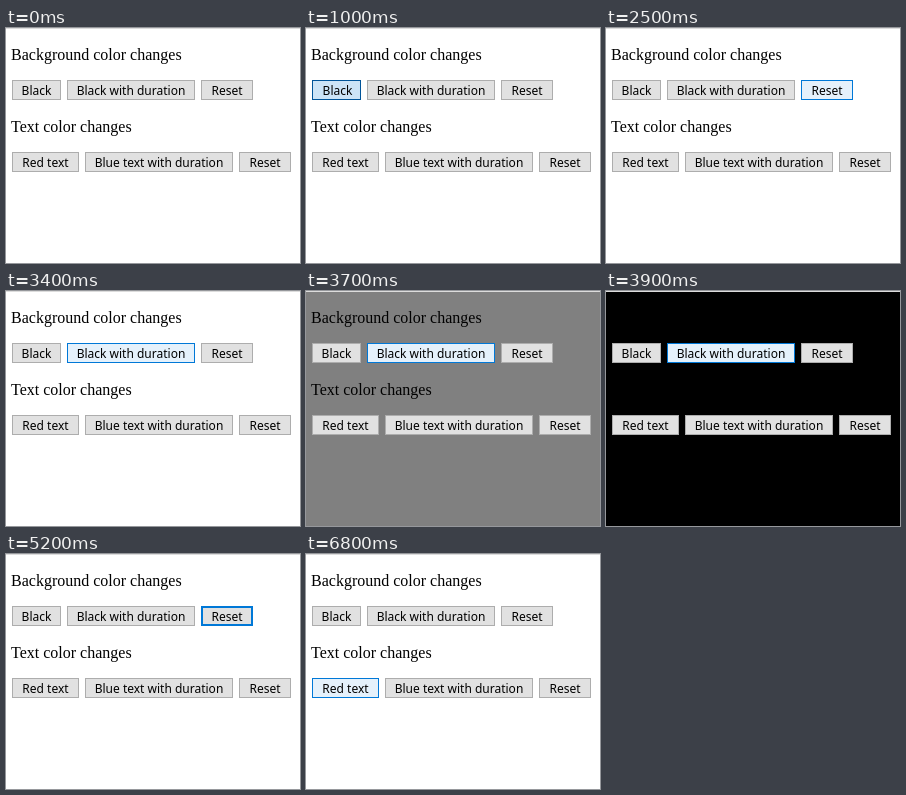
Write an HTML page that moves like this. It is 294x235 px and loops after 8000 ms.

```html
<!DOCTYPE html>
<html lang="en">
<head>
<meta charset="utf-8">
<title>Color changes</title>
<style>
html, body { margin: 0; height: 100%; overflow: hidden; background: #fff; }
svg { display: block; }
.label { font: 16px "Liberation Serif", "Times New Roman", serif; }
.button text { font: 12px "Noto Sans", sans-serif; text-anchor: middle; }
</style>
</head>
<body>
<svg id="stage" width="294" height="235" viewBox="0 0 294 235">
  <rect id="page" width="294" height="235"/>
  <rect width="294" height="1" fill="#dcdcdc"/>
  <text class="label" x="5" y="32">Background color changes</text>
  <text class="label" x="5" y="104">Text color changes</text>
</svg>
<script>
const LOOP = 8000;
const stage = document.getElementById('stage');
const page = document.getElementById('page');

// fill, border colour, border width, text shift
const looks = {
  idle: ['#e1e1e1', '#adadad', 1, 0],
  hover: ['#e5f1fb', '#0078d7', 1, 0],
  press: ['#cce4f7', '#005499', 1, 1],
  focus: ['#e1e1e1', '#0078d7', 2, 0]
};

function add(parent, tag, attrs) {
  const el = document.createElementNS('http://www.w3.org/2000/svg', tag);
  for (const key in attrs) el.setAttribute(key, attrs[key]);
  return parent.appendChild(el);
}

function makeButton(label, x, y, w) {
  const group = add(stage, 'g', { class: 'button' });
  const edge = add(group, 'rect', { x, y, width: w, height: 20 });
  const face = add(group, 'rect', {});
  const text = add(group, 'text', { y: y + 15 });
  text.textContent = label;
  return look => {
    const [fill, border, b, shift] = looks[look];
    edge.setAttribute('fill', border);
    const inner = { x: x + b, y: y + b, width: w - 2 * b, height: 20 - 2 * b, fill };
    for (const key in inner) face.setAttribute(key, inner[key]);
    text.setAttribute('x', x + w / 2 + shift);
  };
}

const buttons = {
  black: makeButton('Black', 6, 52, 49),
  slow: makeButton('Black with duration', 61, 52, 128),
  reset: makeButton('Reset', 195, 52, 52),
  red: makeButton('Red text', 6, 124, 67),
  blue: makeButton('Blue text with duration', 79, 124, 148),
  resetText: makeButton('Reset', 233, 124, 52)
};

// start time and the buttons that are not idle
const steps = [
  [0, {}],
  [400, { slow: 'hover' }],
  [600, { black: 'hover' }],
  [1000, { black: 'press' }],
  [1100, { black: 'hover' }],
  [1500, { black: 'focus', slow: 'hover' }],
  [1900, { black: 'focus', reset: 'hover' }],
  [2300, { reset: 'press' }],
  [2500, { reset: 'hover' }],
  [2800, { reset: 'focus', slow: 'hover' }],
  [3300, { slow: 'press' }],
  [3400, { slow: 'hover' }],
  [4100, { slow: 'focus', reset: 'hover' }],
  [4700, { reset: 'press' }],
  [4800, { reset: 'hover' }],
  [5200, { reset: 'focus' }],
  [5700, {}],
  [6800, { red: 'hover' }]
];

function darkness(t) {
  if (t >= 1100 && t < 2500) return 1;
  if (t < 3500 || t >= 4800) return 0;
  return Math.min(1, Math.floor((t - 3500) / 100) / 4);
}

function draw(now) {
  const t = now % LOOP;
  const active = steps.filter(step => step[0] <= t).pop()[1];
  for (const name in buttons) buttons[name](active[name] || 'idle');
  const level = Math.round(255 * (1 - darkness(t)));
  page.setAttribute('fill', `rgb(${level},${level},${level})`);
}

const start = performance.now();
function tick() {
  draw(performance.now() - start);
  requestAnimationFrame(tick);
}
tick();
</script>
</body>
</html>
```
